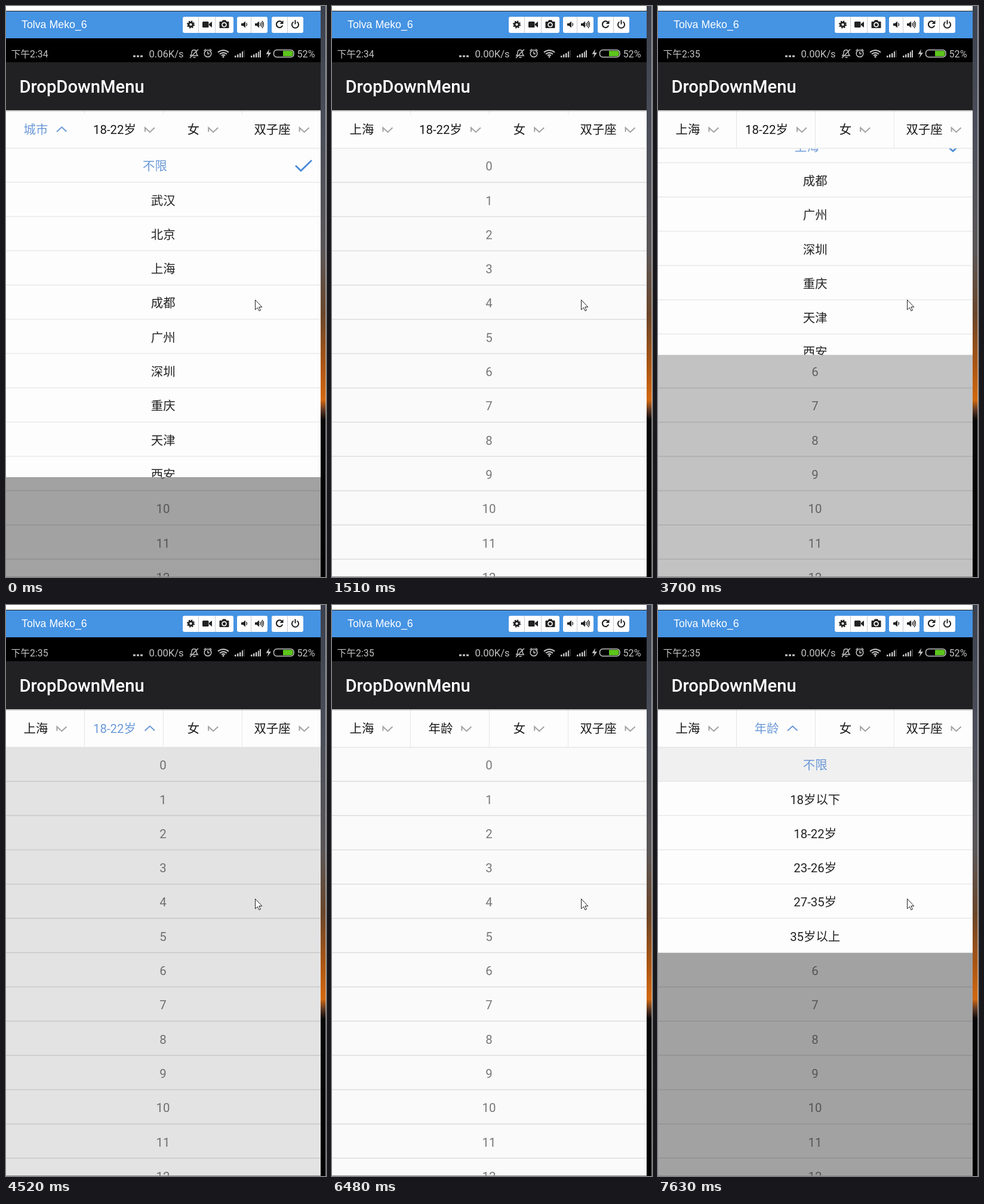
Recreate the animation shown at these times as an HTML page. Size 536 px wide and 955 px high, loop 8000 ms.

```html
<!DOCTYPE html>
<html lang="zh-CN">
<head>
<meta charset="utf-8">
<style>
  html, body { margin: 0; width: 100%; height: 100%; overflow: hidden; background: #fff; }
  svg { display: block; }
  text { font-family: Roboto, "Noto Sans CJK SC", "Noto Sans CJK", sans-serif; font-size: 20.4px; }
  .mid { text-anchor: middle; }
  .line { fill: none; stroke: currentColor; }
  .status { color: #c4c4c4; fill: #c4c4c4; }
  .icon { color: #222; fill: #222; }
</style>
</head>
<body>
<svg id="stage" width="536" height="955" viewBox="0 0 536 955">
  <defs>
    <linearGradient id="wall" x1="0" y1="0" x2="0" y2="1">
      <stop offset="0" stop-color="#3b404c"/>
      <stop offset=".22" stop-color="#4b4e5a"/>
      <stop offset=".43" stop-color="#5a5657"/>
      <stop offset=".54" stop-color="#6a4529"/>
      <stop offset=".63" stop-color="#ab5512"/>
      <stop offset=".69" stop-color="#d2680f"/>
      <stop offset=".708" stop-color="#5b3522"/>
      <stop offset=".725" stop-color="#060606"/>
      <stop offset="1" stop-color="#000"/>
    </linearGradient>
    <linearGradient id="shade" x1="0" y1="0" x2="0" y2="1">
      <stop offset="0" stop-color="#000" stop-opacity=".55"/>
      <stop offset="1" stop-color="#000" stop-opacity="0"/>
    </linearGradient>
  </defs>

  <rect width="536" height="955" fill="#fff"/>
  <rect x="527" width="8.5" height="955" fill="url(#wall)"/>
  <rect y="8" width="527" height="1.2" fill="#222"/>
  <rect y="9" width="527" height="45" fill="#4593e3"/>
  <text x="26" y="37" fill="#fff" style="font:17.8px 'Liberation Sans',Arial,sans-serif">Tolva Meko_6</text>

  <g fill="#fff">
    <rect x="296" y="18" width="85" height="27" rx="3"/>
    <rect x="387" y="18" width="51" height="27" rx="3"/>
    <rect x="445" y="18" width="53" height="27" rx="3"/>
  </g>
  <path class="line" color="#c5cbd2" d="M322.5 18v27M350.5 18v27M410.5 18v27M471.5 18v27"/>
  <g class="icon">
    <circle class="line" cx="309.5" cy="31" r="3.6" stroke-width="3"/>
    <circle class="line" cx="309.5" cy="31" r="5.4" stroke-width="2.4" stroke-dasharray="2.12"/>
    <rect x="329" y="26" width="10.5" height="10" rx="1.5"/>
    <path d="M340 30l5-4v10l-5-4z"/>
    <path fill-rule="evenodd" d="M358.500 26h3l1.500-2.500h5l1.500 2.500h3q1 0 1 1v9q0 1-1 1h-14q-1 0-1-1v-9q0-1 1-1zM365.500 27a4.300 4.300 0 1 0 .01 0z"/>
    <circle cx="365.500" cy="31.300" r="2.600"/>
    <path d="M394 29h3l4-3.500v11l-4-3.500h-3zM417 29h3l4-3.500v11l-4-3.500h-3z"/>
    <path class="line" stroke-width="1.300" d="M402.500 28.500q2 2.500 0 5M425.500 28.500q2 2.500 0 5M427.500 26.800q3 4.200 0 8.400M429 25q5 6 0 12"/>
    <path class="line" stroke-width="2.200" d="M462 27a5.300 5.300 0 1 0 1.200 5.500"/>
    <path d="M464.500 24v6h-6z"/>
    <path class="line" stroke-width="2" d="M481.500 26.500a5.600 5.600 0 1 0 6 0M484.500 23.500v7"/>
  </g>

  <rect y="54" width="527" height="40" fill="#000"/>
  <g class="status">
    <text id="clock" x="8.500" y="85.500" style="font-size:15.800px"></text>
    <path d="M213 82.500h4v3h-4zM219 82.500h4v3h-4zM225 82.500h4v3h-4z"/>
    <text id="speed" x="239.500" y="85.500" style="font-size:16.600px"></text>
    <path class="line" stroke-width="1.400" d="M309 83q2-2 2-5 0-4.500 4-4.500t4 4.500q0 3 2 5zM313.500 86h4M308 87l14-14.500"/>
    <circle class="line" cx="338" cy="79.500" r="5.800" stroke-width="1.500"/>
    <path class="line" stroke-width="1.500" d="M338 76v4h3M331.500 75l3.500-3M344.500 75l-3.500-3"/>
    <path class="line" stroke-width="2" d="M355 77.500q9-7 18 0M358 80.500q6-4.800 12 0M361 83q3-2.300 6 0"/>
    <circle cx="364" cy="85" r="1.500"/>
    <path d="M383 83h2.500v3h-2.500zM387 81h2.500v5h-2.500zM391 79h2.500v7h-2.500zM395 76h2v10h-2z"/>
    <path fill="#444" d="M398 74h1.500v12h-1.500z"/>
    <path d="M410 83h2.500v3h-2.500zM414 81h2.500v5h-2.500zM418 79h2.500v7h-2.500zM422 76.500h2v9.500h-2z"/>
    <path id="bar" d="M425 74h2v12h-2z"/>
    <path d="M441 72l-5.500 8.500h4l-2 6.500 6.500-9h-4z"/>
    <rect class="line" x="448.500" y="73.500" width="33.500" height="12" rx="5" stroke-width="1.500"/>
    <path fill="#5cc51c" d="M464 75h13.500q3 0 3 3v3q0 3-3 3h-13.500z"/>
    <text x="487.500" y="85.500" style="font-size:16.200px">52%</text>
  </g>

  <rect y="94" width="527" height="80" fill="#212123"/>
  <text x="22.500" y="145" fill="#fff" style="font-size:29.200px;font-weight:500">DropDownMenu</text>
  <rect y="174" width="527" height="64" fill="#fdfdfd"/>
  <path id="seps" class="line" color="#e6e6e6"/>
  <rect y="173" width="527" height="4" fill="url(#shade)"/>
  <g id="tabs"></g>

  <svg id="list" y="238" width="527" height="716">
    <rect width="527" height="716" fill="#fafafa"/>
    <g id="numbers"></g>
    <rect id="mask" width="527" height="716" fill="#282729"/>
    <svg id="menu" width="527"></svg>
  </svg>
  <rect y="237.500" width="527" height="1" fill="#dedede"/>
  <rect y="954" width="527" height="1" fill="#8a8a8a"/>
  <path d="M417.500 491.500v16.500l3.800-3.500 2.700 5.500 2.400-1.200-2.600-5.300h5z" fill="#fff" stroke="#222"/>
</svg>

<script>
const ROW = 57.3, BLUE = '#6b99d8', LOOP = 8000;
const lists = {
  city: { height: 550, items: '不限 武汉 北京 上海 成都 广州 深圳 重庆 天津 西安'.split(' ') },
  age: { height: 6 * ROW, items: '不限 18岁以下 18-22岁 23-26岁 27-35岁 35岁以上'.split(' ') }
};

// Each step changes some of the state and holds until the next one.
const steps = [
  [0, { menu: 'city', slide: 0, mask: .42, active: 0, sel: 0, city: '城市', age: '18-22岁',
        clock: '下午2:34', speed: '0.06K/s', seps: 6, bar: 1 }],
  [830, { active: -1, city: '上海' }],
  [1010, { slide: 213, mask: .265, sel: 3 }],
  [1160, { menu: '', mask: 0 }],
  [1510, { speed: '0.00K/s' }],
  [2120, { active: 0, mask: .11, clock: '下午2:35', seps: 62 }],
  [2270, { menu: 'city', slide: 4, mask: .41 }],
  [2440, { slide: 0, mask: .42 }],
  [3700, { active: -1, slide: 204.5, mask: .265 }],
  [3870, { menu: '', mask: 0 }],
  [4520, { active: 1, mask: .11 }],
  [4690, { menu: 'age', sel: 2, slide: 41, mask: .38 }],
  [4880, { slide: 0, mask: .42 }],
  [5840, { bar: .3 }],
  [6160, { active: -1, age: '年龄', sel: 0, slide: 28, mask: .4 }],
  [6310, { menu: '', mask: 0 }],
  [7280, { active: 1, mask: .11 }],
  [7460, { menu: 'age', slide: 41, mask: .38 }],
  [7630, { slide: 0, mask: .42 }]
];
let last = {};
const states = steps.map(([, change]) => last = { ...last, ...change });

const $ = id => document.getElementById(id);
const label = (s, x, y, fill) => `<text class="mid" x="${x}" y="${y}" fill="${fill}">${s}</text>`;
const rule = (i, color) => `<rect y="${(i + 1) * ROW - 1.2}" width="527" height="1.6" fill="${color}"/>`;
const baseline = i => i * ROW + 37.2;

function textWidth(s) {
  return [...s].reduce((w, c) => w + (c > '~' ? 1 : c === '-' ? .28 : .5615), 0) * 20.4;
}

function tab(s, i, on) {
  const w = textWidth(s), x = 66 + 132 * i - (w + 32) / 2;
  const arrow = on ? 'v-.5l8-7.500 8 7.500' : 'v-7l8 7.500 8-7.500';
  return `<text x="${x}" y="214.300" fill="${on ? BLUE : '#191919'}">${s}</text>` +
    `<path class="line" color="${on ? BLUE : '#a2a2a2'}" stroke-width="2" d="M${x + w + 15} 210.500${arrow}"/>`;
}

function menuRow(s, i, kind, on) {
  const checked = on && kind === 'city';
  const fill = on && kind === 'age' ? '#f0f0f0' : '#fdfdfd';
  return `<rect y="${i * ROW}" width="527" height="${ROW + .5}" fill="${fill}"/>` + rule(i, '#e4e4e4') +
    label(s, checked ? 249.5 : 263.2, baseline(i), on ? BLUE : '#222') +
    (checked ? `<path class="line" color="#4a8bd8" stroke-width="2.800" d="M485 ${i * ROW + 29}l9 8.500 18-17.500"/>` : '');
}

function draw(s) {
  $('clock').textContent = s.clock;
  $('speed').textContent = s.speed;
  $('bar').setAttribute('opacity', s.bar);
  $('mask').setAttribute('opacity', s.mask);
  $('seps').setAttribute('d', [131, 263, 395].map(x => `M${x}.500 175v${s.seps}`).join(''));
  $('tabs').innerHTML = [s.city, s.age, '女', '双子座'].map((t, i) => tab(t, i, i === s.active)).join('');
  const menu = $('menu'), list = lists[s.menu];
  menu.setAttribute('y', -s.slide);
  menu.setAttribute('height', list ? list.height : 0);
  menu.innerHTML = list ? list.items.map((t, i) => menuRow(t, i, s.menu, i === s.sel)).join('') : '';
}

$('numbers').innerHTML = Array.from({ length: 13 }, (_, i) =>
  rule(i, '#dfdfdf') + label(i, 263, baseline(i), '#777')).join('');

let shown = -1;
const start = performance.now();
function tick() {
  const t = (performance.now() - start) % LOOP;
  const now = steps.filter(([at]) => at <= t).length - 1;
  if (now !== shown) draw(states[shown = now]);
  requestAnimationFrame(tick);
}
tick();
</script>
</body>
</html>
```
